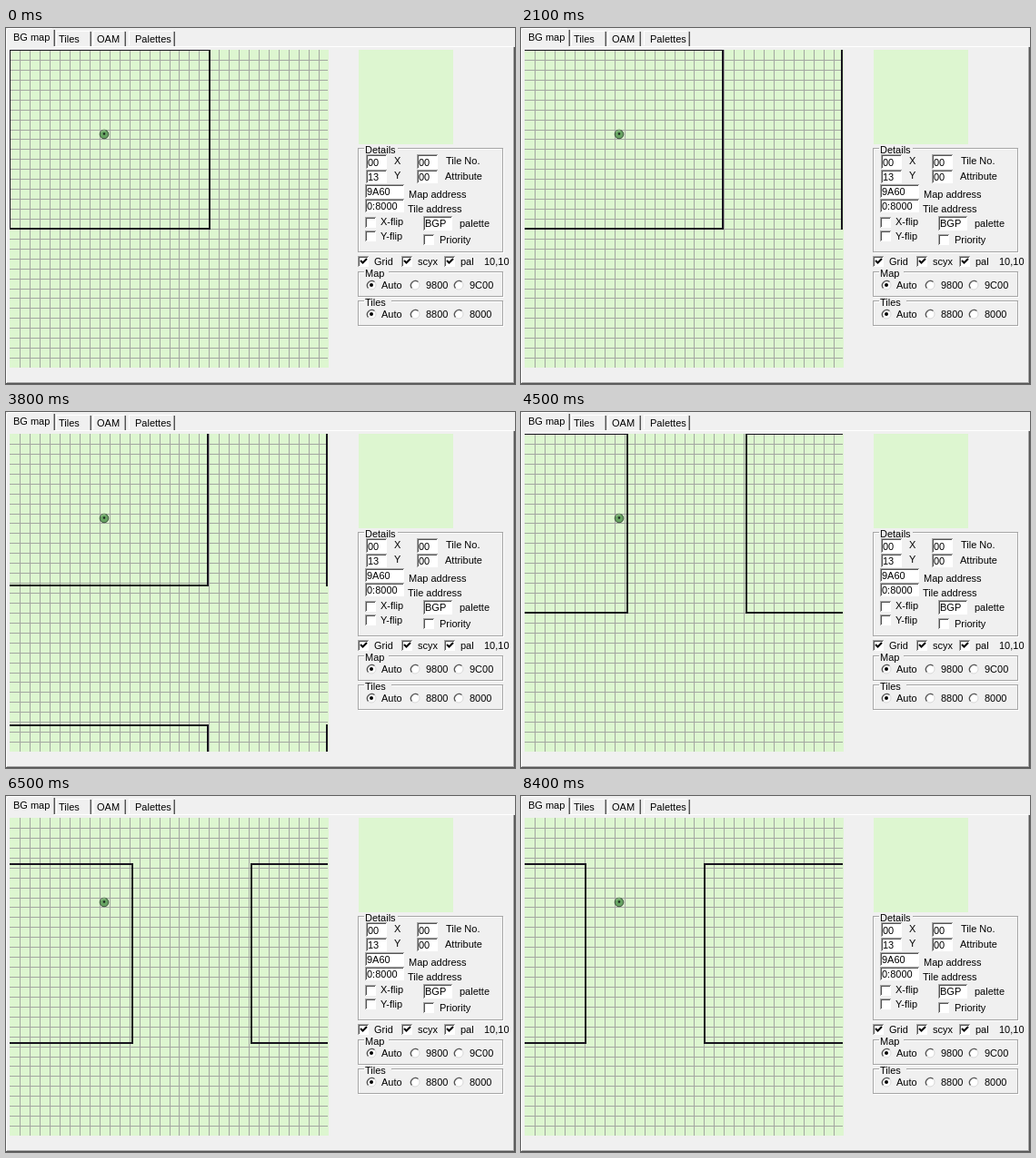
Animation of 560x392 px, one loop 8.5 s. Source, as an HTML page:

```html
<!DOCTYPE html>
<html lang="en">
<head>
<meta charset="utf-8">
<title>BG map viewer</title>
<style>
  html, body { margin: 0; width: 560px; height: 392px; overflow: hidden; background: #f0f0f0; }
  svg { display: block; }
  text { font: 11px "Liberation Sans", Arial, sans-serif; fill: #000; }
  .line { fill: none; stroke-width: 1; }
  .dark { stroke: #555; }
  .grey { stroke: #a5a5a5; }
  .white { stroke: #fff; }
  .green { fill: #ddf6d0; }
  .grid { fill: none; stroke: #a3a6a1; }
  .view rect { fill: none; stroke: #18141f; stroke-width: 2; }
</style>
</head>
<body>
<svg id="stage" width="560" height="392" viewBox="0 0 560 392" shape-rendering="crispEdges">
  <rect width="560" height="392" fill="#f0f0f0"/>

  <path class="line white" d="M.5 390V2.5L2.5 .5H51M53 20.5H558M55.5 19V3.5H92M96.5 19V3.5H130M135.5 19V3.5H183"/>
  <path class="line dark" d="M53.5 2V20M93.5 4V20M131.5 4V20M185.5 4V20M559.5 21V391.5H0"/>
  <path class="line grey" d="M52.5 2V20M92.5 4V20M130.5 4V20M184.5 4V20M558.5 21V390.5H1"/>

  <rect class="green" x="388" y="24" width="104" height="104"/>

  <rect class="green" x="4" y="24" width="351" height="350"/>
  <svg x="4" y="24" width="350" height="350">
    <path class="grid" id="grid"/>
    <g class="view" id="view"></g>
  </svg>

  <g shape-rendering="auto">
    <circle cx="108" cy="117" r="4.8" fill="#67a362" stroke="#3a4f3b"/>
    <path d="M104.5 115a4 4 0 0 1 5-2" stroke="#a9d19f" fill="none"/>
    <circle cx="108" cy="116.5" r="1.2" fill="#17231b"/>
  </g>

  <g id="ui"></g>
</svg>
<script>
const NS = "http://www.w3.org/2000/svg";
const ui = document.getElementById("ui");
const view = document.getElementById("view");

function add(parent, tag, attrs, content = "") {
  const el = document.createElementNS(NS, tag);
  for (const key in attrs) el.setAttribute(key, attrs[key]);
  el.textContent = content;
  parent.append(el);
}

const line = (cls, d) => add(ui, "path", { class: "line " + cls, d });
const text = (x, y, str) => add(ui, "text", { x, y }, str);

function inset(x, y, w, h) {
  add(ui, "rect", { x, y, width: w, height: h, fill: "#fff" });
  line("grey", `M${x + .5} ${y + h}V${y + .5}H${x + w}`);
  line("dark", `M${x + 1.5} ${y + h - 1}V${y + 1.5}H${x + w - 1}`);
}

function field(x, y, w, h, base, str) {
  inset(x, y, w, h);
  text(x + 2, base, str);
}

function group(y, h, label, gap) {
  const frame = `M393 ${y}H387V${y + h}H546V${y}H${396 + gap}`;
  add(ui, "path", { class: "line white", d: frame, transform: "translate(1.5 1.5)" });
  add(ui, "path", { class: "line grey", d: frame, transform: "translate(.5 .5)" });
  text(395, y + 6, label);
}

function check(x, y, on) {
  inset(x, y, 12, 12);
  if (on) add(ui, "path", {
    d: `M${x + 3} ${y + 5}l2.5 2.5l4.5 -4.5`, fill: "none",
    stroke: "#000", "stroke-width": 2, "shape-rendering": "auto"
  });
}

function radio(cx, cy, on) {
  const round = attrs => add(ui, "circle", { cx, cy, "shape-rendering": "auto", ...attrs });
  round({ r: 5, fill: "#fff", stroke: "#d8d8d8" });
  add(ui, "path", {
    d: `M${cx - 3.5} ${cy + 3.5}a5 5 0 0 1 7 -7`, fill: "none",
    stroke: "#555", "stroke-width": 1.3, "shape-rendering": "auto"
  });
  if (on) round({ r: 2, fill: "#000" });
}

text(8, 14, "BG map");
text(58, 16, "Tiles");
text(100, 16, "OAM");
text(142, 16, "Palettes");

group(132, 114, "Details", 34);
field(396, 139, 23, 16, 152, "00");
field(396, 156, 23, 15, 168, "13");
field(452, 139, 23, 16, 152, "00");
field(452, 156, 23, 15, 168, "00");
field(395, 172, 43, 15, 184, "9A60");
field(395, 188, 43, 15, 200, "0:8000");
field(459, 207, 32, 16, 219, "BGP");
text(427, 150, "X");
text(427, 166, "Y");
text(484, 150, "Tile No.");
text(483, 167, "Attribute");
text(443, 187, "Map address");
text(442, 203, "Tile address");
text(412, 217, "X-flip");
text(412, 233, "Y-flip");
text(499, 219, "palette");
text(477, 237, "Priority");
check(395, 208);
check(395, 223);
check(459, 227);

[[387, "Grid"], [435, "scyx"], [482, "pal"]].forEach(([x, label]) => {
  check(x, 251, true);
  text(x + 18, 261, label);
});
text(526, 261, "10,10");

function choices(y, title, gap, labels) {
  group(y, 27, title, gap);
  labels.forEach((label, i) => {
    const x = [402, 450, 498][i];
    radio(x, y + 15, i === 0);
    text(i ? x + 12 : 413, y + 19, label);
  });
}
choices(268, "Map", 24, ["Auto", "9800", "9C00"]);
choices(300, "Tiles", 27, ["Auto", "8800", "8000"]);

let d = "";
for (let i = 1; i < 32; i++) {
  d += `M${Math.round(i * 351 / 32) + .5} 0v350M0 ${Math.round(i * 350 / 32) + .5}h351`;
}
document.getElementById("grid").setAttribute("d", d);

// The visible screen wraps around the map edges.
const SIZE = 351;
for (const x of [0, SIZE])
  for (const y of [0, SIZE])
    add(view, "rect", { x, y, width: 220, height: 197 });

// time, x, y
const path = [
  [0, 0, 0], [1200, 98, 0], [1300, 98, 0], [2100, -2, 0], [2200, -2, 0],
  [2600, -2, 34], [3500, -2, -30], [4299, -2, -30],
  [4300, -91, 0], [5000, -147, 0], [5800, -85, 0], [5900, -85, 0],
  [6500, -85, 51], [6800, -85, 51], [7200, -127, 51], [7600, -127, 51],
  [8000, -153, 51], [8500, -153, 51]
];
const LOOP = 8500, TICK = 100;

function draw(now) {
  const t = Math.floor(now % LOOP / TICK) * TICK;
  const i = path.findIndex(p => p[0] > t);
  const [a, b] = [path[i - 1], path[i]];
  const k = (t - a[0]) / (b[0] - a[0]);
  const at = n => Math.round(a[n] + (b[n] - a[n]) * k);
  view.setAttribute("transform", `translate(${at(1)} ${at(2)})`);
}

let start;
function tick(now) {
  start ??= now;
  draw(now - start);
  requestAnimationFrame(tick);
}
draw(0);
requestAnimationFrame(tick);
</script>
</body>
</html>
```
